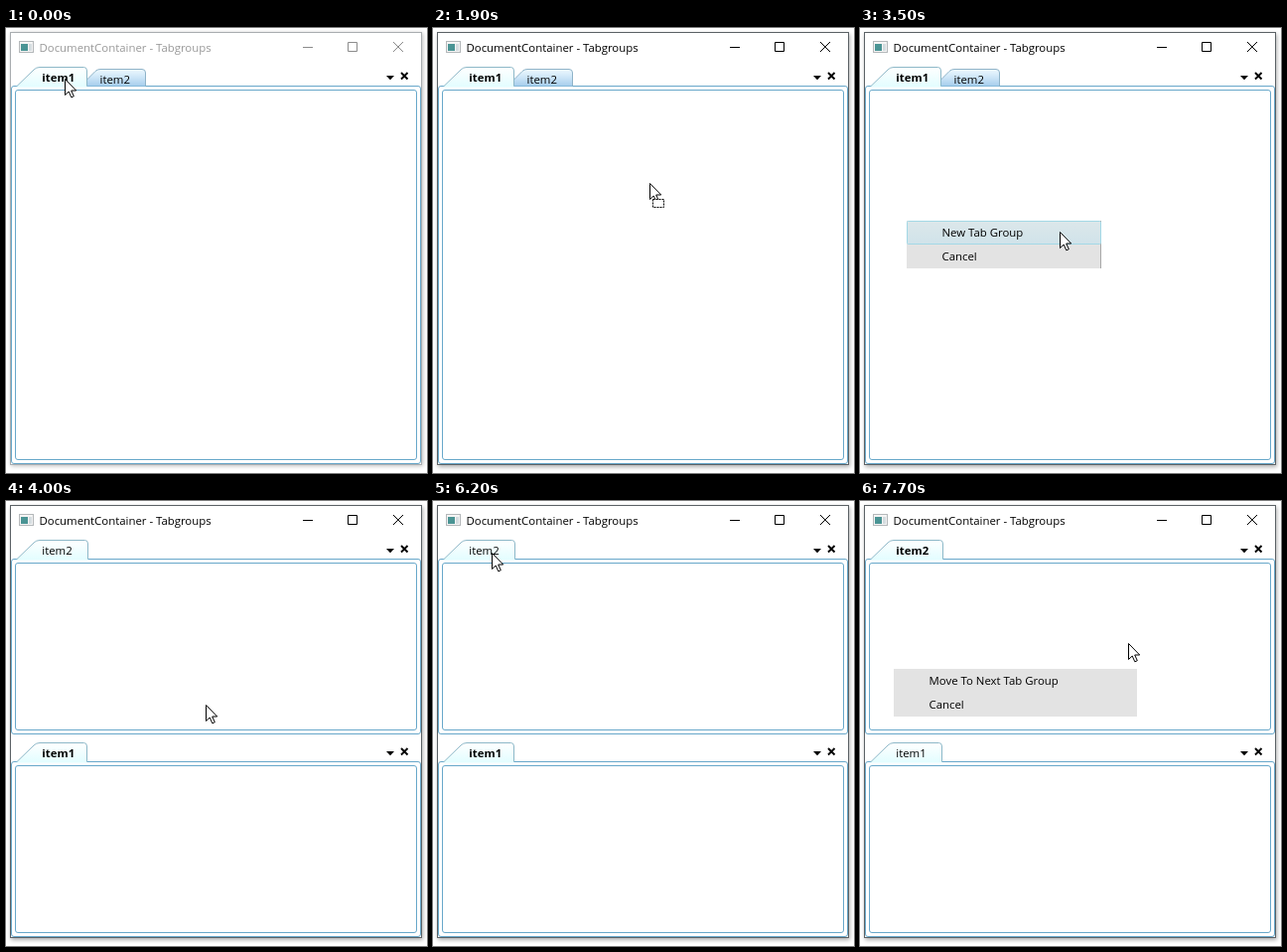
Write an HTML page that moves like this. It is 424x448 px and loops after 8000 ms.

```html
<!DOCTYPE html>
<html lang="en">
<head>
<meta charset="utf-8">
<title>Tab groups</title>
<style>
  html, body { margin: 0; width: 424px; height: 448px; overflow: hidden; background: #fff; }
  svg { display: block; }
  text { font: 11.4px "Open Sans", "Noto Sans", sans-serif; fill: #000; }
  .bold { font-weight: 700; }
  .line { fill: #fff; stroke: #68a8ca; }
  #frame { fill: #fff; stroke: #5c6266; filter: drop-shadow(1px 2px 2px rgba(0, 0, 0, .32)); }
  #controls { fill: none; stroke: #000; }
  .inactive #frame { stroke: #a9adb0; filter: drop-shadow(1px 1px 2px rgba(0, 0, 0, .26)); }
  .inactive #controls { stroke: #8c8c8c; }
  .inactive #title { fill: #999; }
</style>
</head>
<body>
<svg id="stage" width="424" height="448" viewBox="0 0 424 448">
  <defs>
    <linearGradient id="front" x2="0" y2="1">
      <stop stop-color="#fff"/><stop offset="1" stop-color="#e2fdff"/>
    </linearGradient>
    <linearGradient id="back" x2="0" y2="1">
      <stop stop-color="#eef9fe"/><stop offset=".45" stop-color="#cfe7f8"/><stop offset="1" stop-color="#a6cdec"/>
    </linearGradient>
    <linearGradient id="hover" x2="0" y2="1">
      <stop stop-color="#dce7ea"/><stop offset="1" stop-color="#d0e3ea"/>
    </linearGradient>
  </defs>

  <rect id="frame" x="4.5" y="4.5" width="414" height="435"/>
  <rect x="13.5" y="13.5" width="14" height="11" fill="#f4f4f4" stroke="#b4b8ba"/>
  <rect x="15" y="16" width="7" height="7" fill="#4a9494"/>
  <rect x="23" y="16" width="3" height="7" fill="#d5dde0"/>
  <text id="title" x="33.5" y="24">DocumentContainer - Tabgroups</text>
  <path id="controls" d="M299 19.5h10M344.5 14.5h9v9h-9zM390 14l10 10m0-10l-10 10"/>

  <g id="single"></g>
  <g id="splitA"></g>
  <g id="splitB"></g>
  <g id="menuA"></g>
  <g id="menuB"></g>

  <g id="cursor">
    <path d="M.5.5v16l3.7-3.5 2.6 5.8 2.5-1.1-2.6-5.7h5z" fill="#fff" stroke="#000"/>
    <rect id="drop" x="3.5" y="16.5" width="11" height="8" fill="#fff" stroke="#000" stroke-dasharray="2 1"/>
  </g>
</svg>
<script>
const $ = id => document.getElementById(id);

const label = (x, y, s, bold) => `<text x="${x}" y="${y}"${bold ? ' class="bold"' : ''}>${s}</text>`;

const box = (x, y, w, h) => `<rect class="line" x="${x}" y="${y}" width="${w}" height="${h}" rx="2.5"/>`;

// A tab group whose panel starts at y = 58 + dy
function group(dy, height, name, bold, right, extra = '') {
  return `<g transform="translate(0 ${dy})">
    ${box(5.5, 58.5, 412, height)}${extra}
    <path d="M11 58.5L28 42Q30.500 39.500 34 39.500H${right - 3}q3 0 3 3.500V59.500H10z" fill="url(#front)"/>
    <path d="M11 58.5L28 42Q30.500 39.500 34 39.500H${right - 3}q3 0 3 3.500V58.500" fill="none" stroke="#8db8c8"/>
    ${box(9.5, 62.5, 404, height - 8)}
    ${label(36.3, 54, name, bold)}
    <path d="M383 48h8l-4 4.300z"/>
    <path d="M398 45l6.500 6.500m0-6.500l-6.500 6.500" stroke="#000" stroke-width="1.900"/>
  </g>`;
}

function menu(x, y, w, first, decor = '') {
  return `<rect x="${x}" y="${y}" width="${w}" height="48" fill="#e3e3e3"/>${decor}
    ${label(x + 35.5, y + 16, first)}${label(x + 35.5, y + 40, 'Cancel')}`;
}

const backTab = `<path d="M81.500 58.500V52L90 43.500Q92 41.500 95 41.500H137q3.500 0 3.500 3.500V58.500"
  fill="url(#back)" stroke="#8fb3c8"/>${label(94.5, 56, 'item2')}`;

$('single').innerHTML = group(0, 380, 'item1', true, 81.5, backTab);
$('splitA').innerHTML = group(0, 176, 'item2', false, 82.5) + group(204, 176, 'item1', true, 81.5);
$('splitB').innerHTML = group(0, 176, 'item2', true, 83.5) + group(204, 176, 'item1', false, 82.5);
$('menuA').innerHTML = menu(47, 194, 196, 'New Tab Group',
  `<path d="M242.500 194v48" stroke="#a8a8a8"/>
   <rect id="glow" x="47.500" y="194.500" width="195" height="23" rx="1" fill="url(#hover)" stroke="#a3d8e6"/>`);
$('menuB').innerHTML = menu(34, 169, 245, 'Move To Next Tab Group');

// Pointer keys: time, x, y
const path = [
  [0, 59, 51], [200, 59, 51], [300, 50, 48], [1100, 50, 48],
  [1200, 102, 72], [2000, 234, 168], [2800, 234, 168], [3500, 201, 205],
  [5500, 201, 205], [5600, 157, 134], [6000, 48, 48], [6100, 48, 48],
  [6200, 59, 52], [6300, 63, 54], [6400, 48, 48], [6800, 48, 48],
  [6900, 172, 122], [7200, 260, 146], [7300, 270, 143], [8000, 270, 143]
];

function pointer(t) {
  const i = path.findIndex(k => k[0] > t);
  const [t0, x0, y0] = path[i - 1], [t1, x1, y1] = path[i];
  const p = (t - t0) / (t1 - t0);
  return [Math.round(x0 + (x1 - x0) * p), Math.round(y0 + (y1 - y0) * p)];
}

const show = (id, on) => $(id).setAttribute('visibility', on ? 'visible' : 'hidden');

function draw(now) {
  const ms = (now - start + 8000) % 8000;
  const t = Math.floor(ms / 100) * 100;
  const within = (a, b) => t >= a && t < b;
  const [x, y] = pointer(t);
  $('stage').setAttribute('class', t < 300 ? 'inactive' : '');
  $('cursor').setAttribute('transform', `translate(${x} ${y})`);
  show('single', t < 4000);
  show('splitA', within(4000, 6600));
  show('splitB', t >= 6600);
  show('menuA', within(2400, 4000));
  show('glow', within(2900, 4000) && y >= 194);
  show('menuB', t >= 7700);
  show('drop', within(1200, 2400) || within(6900, 7700));
  requestAnimationFrame(draw);
}

const start = performance.now();
draw(start);
</script>
</body>
</html>
```
